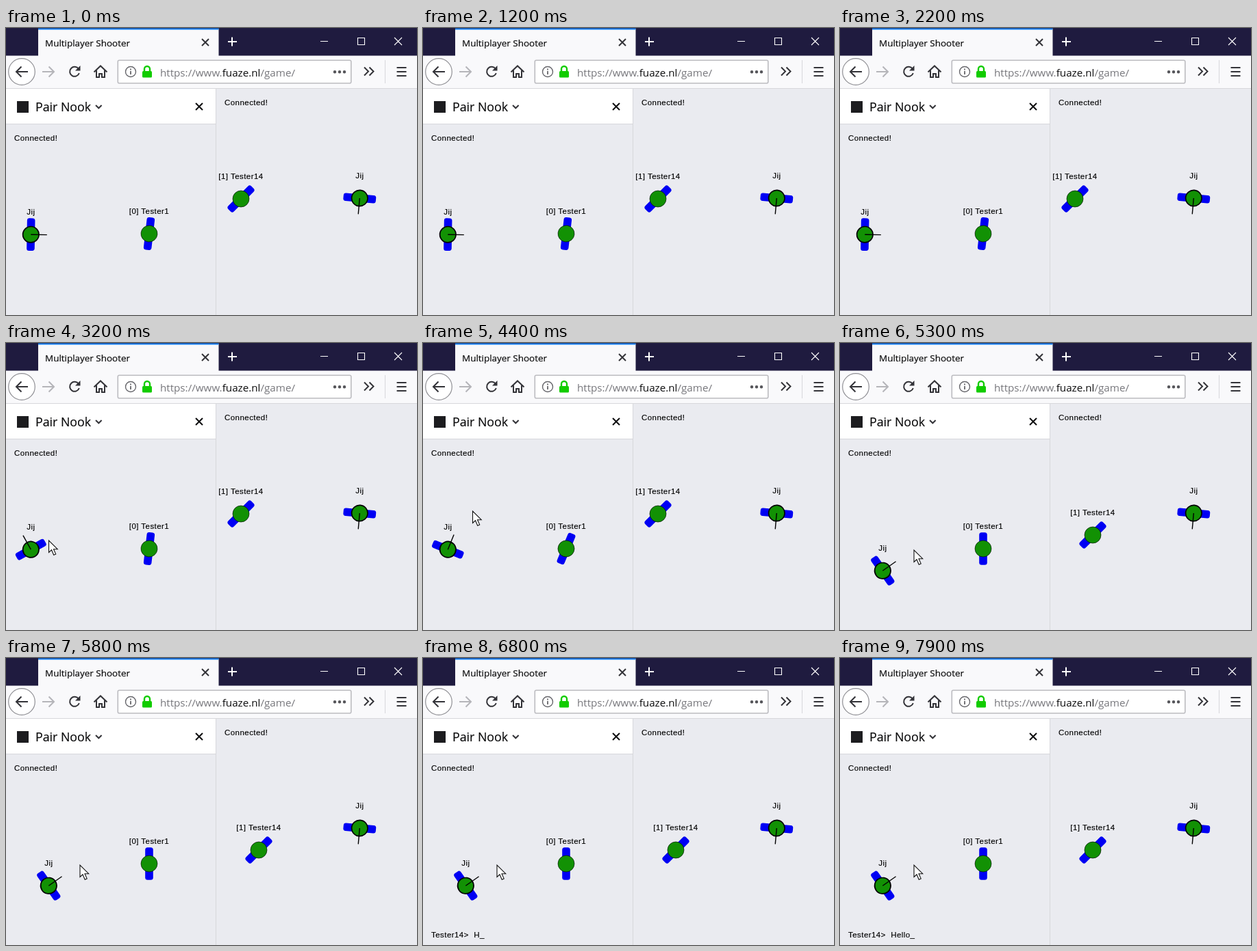
An HTML page for the animation above (8 s loop, 600 by 420 pixels).

```html
<!DOCTYPE html>
<html lang="en">
<head>
<meta charset="utf-8">
<title>Multiplayer Shooter</title>
<style>
html, body { margin: 0; width: 100%; height: 100%; overflow: hidden; background: #eaebf0; }
svg { display: block; }
text { white-space: pre; fill: #0c0c0d; }
.ui { font-family: "Open Sans", "Noto Sans", sans-serif; stroke: #0c0c0d; stroke-width: .2px; }
.url, .url tspan { stroke: none; }
.game { font: 11.5px "Liberation Sans", Arial, sans-serif; letter-spacing: .45px; fill: #000; stroke: #000; stroke-width: .15px; }
.name { text-anchor: middle; }
.line { fill: none; stroke: #333338; stroke-width: 2; }
.win { fill: none; stroke: #fff; stroke-width: 1.1; }
.rule { fill: none; stroke: #d7d7db; }
</style>
</head>
<body>
<svg width="600" height="420" viewBox="0 0 600 420">
  <rect width="600" height="420" fill="#eaebf0"/>

  <!-- title bar -->
  <rect width="600" height="41" fill="#1f1b3f"/>
  <rect x="47" y="1" width="263.5" height="40" fill="#f9f9fb"/>
  <rect x="47" y=".5" width="263.5" height="2" fill="#1a84f5"/>
  <text class="ui" x="57" y="27" font-size="13.45">Multiplayer Shooter</text>
  <path class="line" d="M286 16l10 10M296 16l-10 10"/>
  <path class="win" style="stroke-width:2" d="M324 20h13M330 13.5v13"/>
  <path class="win" d="M459 19.5h11M513.5 14.5h10v10h-10zM567 14l11 11M578 14l-11 11"/>

  <!-- toolbar -->
  <rect y="40.5" width="600" height="47.5" fill="#f9f9fb"/>
  <path class="rule" d="M0 88.5H600M553.5 47v34"/>
  <circle cx="23" cy="64" r="19.3" fill="#fff" stroke="#8f8f94" stroke-width="1.2"/>
  <path class="line" d="M32 64H15M22.5 56.5L15 64l7.5 7.5"/>
  <path class="line" style="stroke:#b5b5b9" d="M53 64h17M62.5 56.5L70 64l-7.5 7.5"/>
  <path class="line" d="M106 60a7 7 0 1 0 .8 6"/>
  <path d="M108.5 55v7.5H101z" fill="#333338"/>
  <path class="line" d="M128.5 64.500l9.500-9 9.500 9M132 62v10h4v-5h4v5h4V62"/>
  <rect x="163.300" y="47.200" width="340.500" height="33.600" rx="2" fill="#fff" stroke="#bcbcc0" stroke-width="1.600"/>
  <circle class="line" style="stroke:#66666b;stroke-width:1.400" cx="182" cy="64" r="7.500"/>
  <path d="M182 63v5M182 59.500v2" stroke="#66666b" stroke-width="1.800"/>
  <path d="M202 64v-4a4 4 0 0 1 8 0v4" fill="none" stroke="#12cc00" stroke-width="2.400"/>
  <rect x="199" y="63" width="14" height="9.500" rx="1.500" fill="#12cc00"/>
  <text class="ui url" x="225" y="70.500" font-size="15.200" style="fill:#77777c">https://www.<tspan fill="#0c0c0d">fuaze.nl</tspan>/game/</text>
  <path d="M480 64.300h14.100" stroke="#55555a" stroke-width="4.500" stroke-linecap="round" stroke-dasharray="0 7"/>
  <path class="line" d="M523 57.500l6 6-6 6M530.500 57.500l6 6-6 6"/>
  <path class="line" d="M570.500 58h14M570.500 64h14M570.500 70h14"/>

  <!-- sidebar -->
  <rect y="89" width="306" height="51" fill="#fff"/>
  <path class="rule" d="M0 140.500H306M306.500 89V420"/>
  <rect x="16" y="107" width="17" height="17" fill="#1c1c1f"/>
  <text class="ui" x="43" y="122" font-size="17.800">Pair Nook</text>
  <path class="line" d="M131 113l4.300 4.300 4.300-4.300"/>
  <path class="line" style="stroke:#0c0c0d" d="M277 110l10 10M287 110l-10 10"/>

  <text class="game" x="12" y="165">Connected!</text>
  <text class="game" x="319" y="113">Connected!</text>
  <g id="players"></g>
  <text class="game" id="chat" x="12" y="409"></text>
  <path id="cursor" d="M0 0V17.500l4-3.700 3.200 7.400 3-1.300-3.200-7.200h5.700z" fill="#fff" stroke="#111" stroke-width="1.100"/>
</svg>
<script>
const LOOP = 8000, STEP = 100;
const PROMPT = "Tester14>  ", WORD = "Hello";
const PROMPT_AT = 6400, TYPE_AT = 6600, KEY_TIME = 200;
const ENTER = 2400, LIFT = 3200, WALK = 4400, STOP = 5000;

const ramp = (t, from, to) => Math.min(1, Math.max(0, (t - from) / (to - from)));
const ease = (t, from, to) => {
  const k = ramp(t, from, to);
  return k * k * (3 - 2 * k);
};

function makePlayer(label, own) {
  const g = document.createElementNS("http://www.w3.org/2000/svg", "g");
  g.innerHTML = `<text class="game name" y="-29.5">${label}</text>
    <g><rect x="-5.8" y="-23.8" width="11.6" height="47.6" rx="3.5" fill="#0000f3"/>
    <circle r="${own ? 11.7 : 12}" fill="#129104" stroke="#000" stroke-width="${own ? 1.7 : .6}"/>
    ${own ? '<path d="M0 0H23.5" stroke="#000" stroke-width="1.4"/>' : ""}</g>`;
  document.getElementById("players").append(g);
  return (x, y, angle) => {
    g.setAttribute("transform", `translate(${x} ${y})`);
    g.lastElementChild.setAttribute("transform", `rotate(${angle})`);
  };
}

const me = makePlayer("Jij", true);
const rival = makePlayer("[0] Tester1", false);
const guest = makePlayer("[1] Tester14", false);
const other = makePlayer("Jij", true);
const chat = document.getElementById("chat");
const cursor = document.getElementById("cursor");
other(516.3, 249, 95);

function draw(t) {
  // the mouse swings in, lifts, then drops to the right
  const swing = ease(t, ENTER, LIFT), lift = ease(t, LIFT, WALK), drop = ease(t, WALK, STOP);
  const mx = 92 - 29.5 * swing + 10 * lift + 35.5 * drop;
  const my = 302 - 13 * swing - 43 * lift + 57 * drop;
  cursor.setAttribute("transform", `translate(${mx} ${my})`);
  cursor.style.display = t < ENTER ? "none" : "";

  // both views share the walk: down-right, then a small step back
  const walk = ramp(t, WALK, STOP), back = ramp(t, STOP, STOP + 300);
  const dx = 27 * walk - back, dy = 33 * walk - 2 * back;
  me(36.3 + dx, 302.2 + dy, 1 - 120 * swing + 51 * lift + 33 * drop);
  guest(343 + 26 * walk, 250 + dy, 45);
  rival(209, 301, 6.5 + 16 * ease(t, WALK - 400, WALK) - 22.5 * drop);

  const typed = Math.max(0, Math.floor((t - TYPE_AT) / KEY_TIME));
  chat.textContent = t < PROMPT_AT ? "" : PROMPT + WORD.slice(0, typed) + "_";
}

const start = performance.now();
function tick(now) {
  const t = Math.max(0, now - start) % LOOP;
  draw(Math.floor(t / STEP) * STEP);
  requestAnimationFrame(tick);
}
draw(0);
requestAnimationFrame(tick);
</script>
</body>
</html>
```
